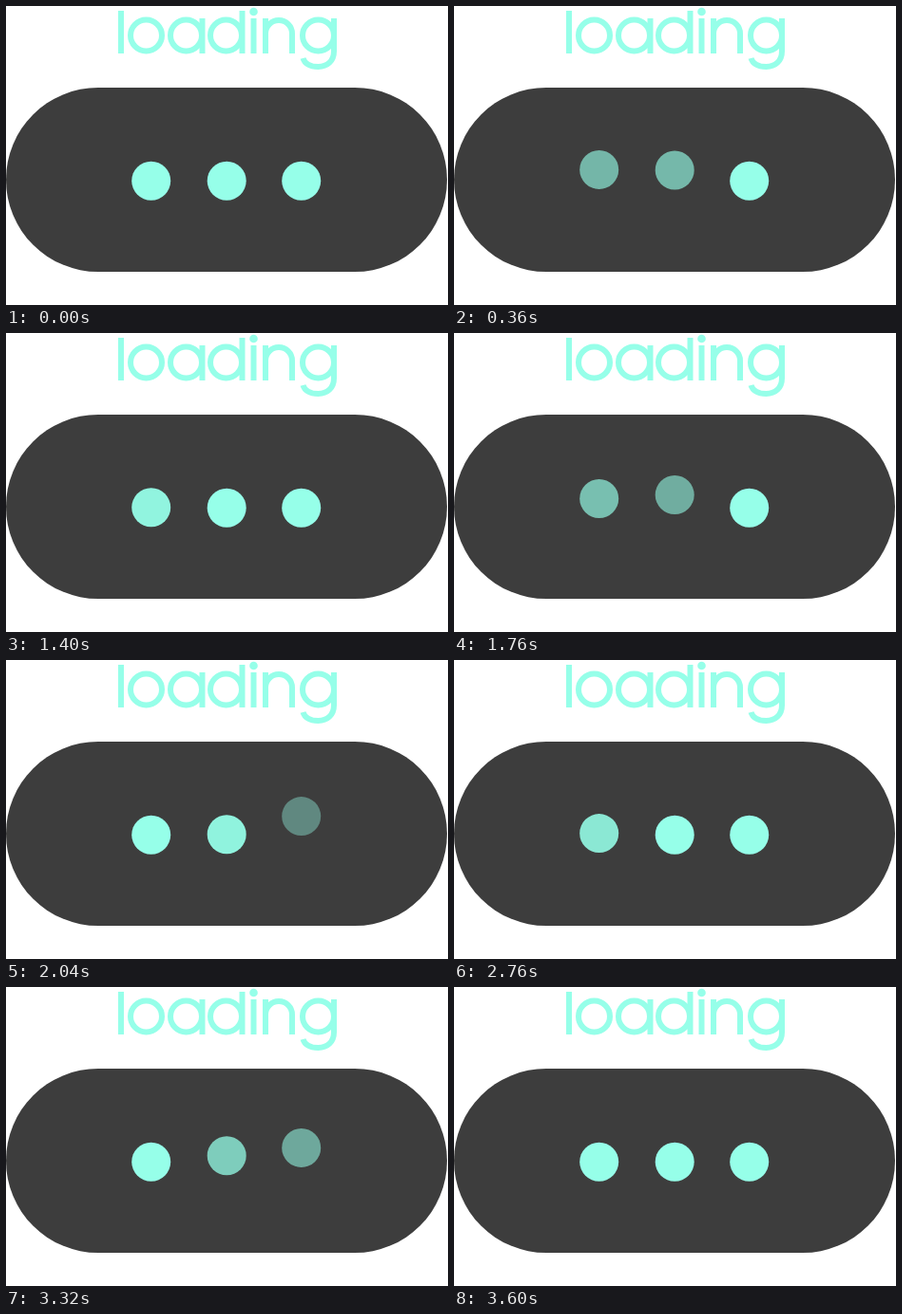
Animation, 465 px wide and 315 px high, one loop 4040 ms. Source, as an HTML page:

```html
<!DOCTYPE html>
<html lang="en">
<head>
<meta charset="utf-8">
<title>loading</title>
<style>
  html, body { margin: 0; width: 100%; height: 100%; overflow: hidden; background: #fff; }
  svg { display: block; }
  .word { fill: none; stroke: #96ffe9; stroke-width: 6; }
  .dot { fill: #96ffe9; }
</style>
</head>
<body>
<svg width="465" height="315" viewBox="0 0 465 315">
  <g class="word" role="img" aria-label="loading">
    <path d="M121 5V50"/>
    <circle cx="147.5" cy="31" r="16.5"/>
    <circle cx="189.5" cy="31" r="16.5"/>
    <path d="M206.5 13V50"/>
    <circle cx="231.5" cy="31" r="16.5"/>
    <path d="M248.5 5V50"/>
    <path d="M260.5 13V50"/>
    <circle class="dot" cx="260.5" cy="6" r="4.3" stroke="none" style="stroke:none;fill:#96ffe9"/>
    <path d="M273 13V50M273 29a14 14 0 0 1 28 0V50"/>
    <circle cx="328.5" cy="31" r="16.5"/>
    <path d="M345 13V47.5C345 58 338 64 328.5 64S314 60 312.5 55"/>
  </g>
  <rect y="86" width="464" height="194" rx="97" fill="#3d3d3d"/>
  <circle class="dot" cx="152.7" cy="184.2" r="20.5"/>
  <circle class="dot" cx="232.2" cy="184.2" r="20.5"/>
  <circle class="dot" cx="310.7" cy="184.2" r="20.5"/>
</svg>
<script>
  const LOOP = 4040, STEP = 40, LIFT = 20, FADE = 0.67;
  const cycles = [0, 1380, 2720];
  // start, peak and end of each hop, in ms from the start of a cycle
  const hops = [[0, 230, 525], [230, 470, 680], [440, 680, 870]];
  const dots = document.querySelectorAll("svg > .dot");

  const smooth = u => u * u * (3 - 2 * u);

  function hop(t, [start, peak, end]) {
    const u = Math.min((t - start) / (peak - start), (end - t) / (end - peak));
    return Math.max(0, u);
  }

  function draw(now) {
    const time = Math.floor(now % LOOP / STEP) * STEP;
    const t = time - cycles.filter(c => c <= time).pop();
    dots.forEach((dot, i) => {
      const u = hop(t, hops[i]);
      dot.setAttribute("cy", 184.2 - LIFT * smooth(u));
      dot.setAttribute("opacity", 1 - FADE * u);
    });
  }

  const origin = performance.now();
  function tick() {
    draw(performance.now() - origin);
    requestAnimationFrame(tick);
  }
  tick();
</script>
</body>
</html>
```
